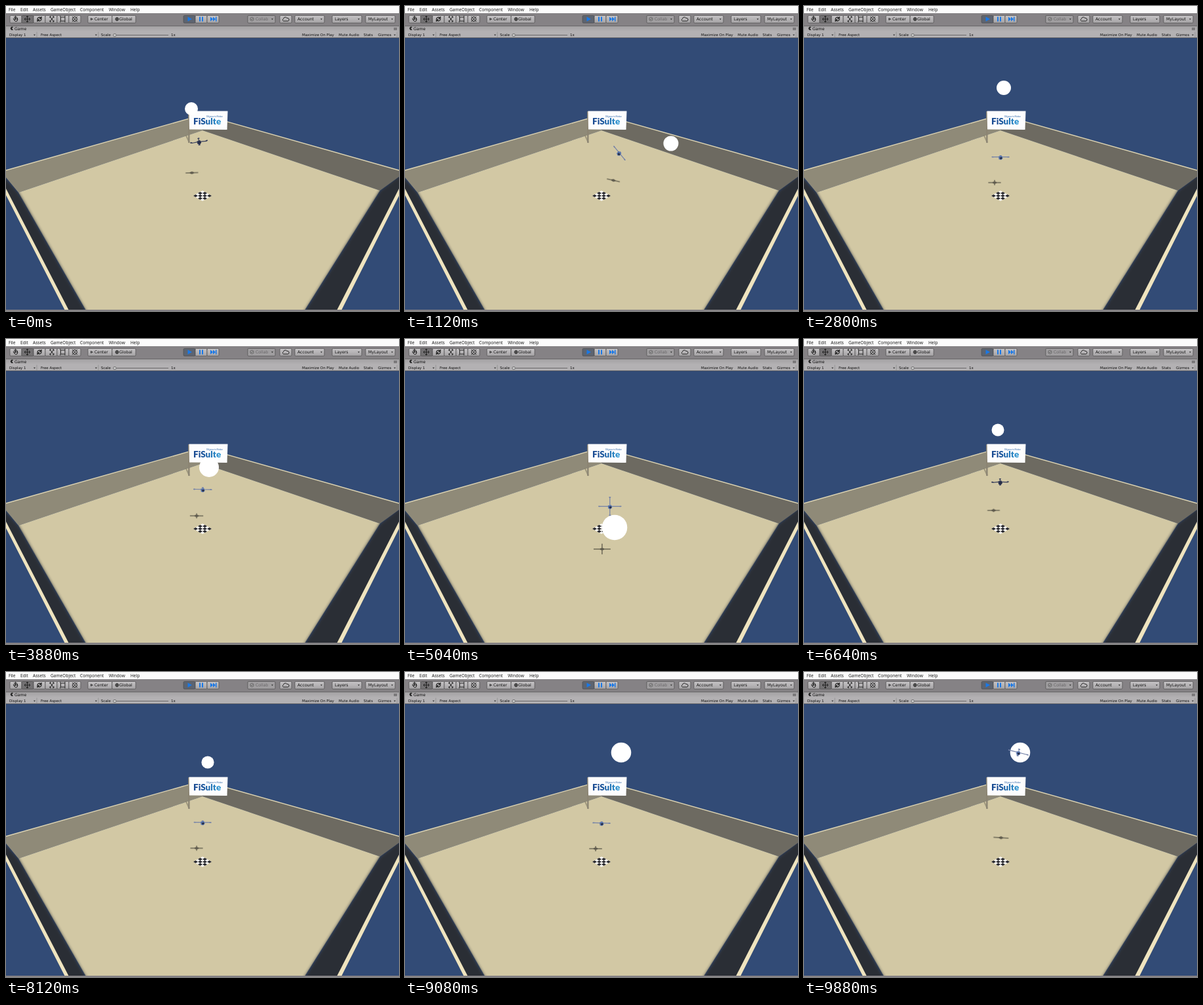
Write an HTML page that moves like this. It is 600 px wide and 466 px high and loops after 9920 ms.

```html
<!DOCTYPE html>
<html lang="en">
<head>
<meta charset="utf-8">
<title>Drone training</title>
<style>
  html, body { margin: 0; width: 100%; height: 100%; overflow: hidden; background: #324b76; }
  svg { display: block; width: 600px; height: 466px; }
  .menu { font: 6.6px "Open Sans", sans-serif; fill: #111; }
  .btn { font: 6.2px "DejaVu Sans", sans-serif; fill: #111; }
  .opt { font: 5.5px "DejaVu Sans", sans-serif; fill: #111; }
  .off { fill: #686668; }
  .sign { font: 900 13.5px Lato, sans-serif; font-variant-ligatures: none; fill: url(#brand); }
  .motto { font: 2.9px Lato, sans-serif; fill: #2b65a8; }
  .ico { fill: none; stroke: #222; stroke-width: 1; }
</style>
</head>
<body>
<svg viewBox="0 0 600 466">
  <defs>
    <filter id="soft" x="-20%" y="-20%" width="140%" height="140%"><feGaussianBlur stdDeviation="2.2"/></filter>
    <filter id="smudge" x="-60%" y="-150%" width="220%" height="400%"><feGaussianBlur stdDeviation=".7"/></filter>
    <linearGradient id="face" x2="0" y2="1"><stop stop-color="#c6c4c6"/><stop offset="1" stop-color="#a5a3a5"/></linearGradient>
    <linearGradient id="tabs" x2="0" y2="1"><stop stop-color="#a19fa1"/><stop offset="1" stop-color="#b3b1b3"/></linearGradient>
    <linearGradient id="brand"><stop offset=".25" stop-color="#184a92"/><stop offset="1" stop-color="#2d9ad6"/></linearGradient>
    <clipPath id="pit"><path d="M0 262L19 285 300 190 571 282 600 261V280L506 465H95L0 280Z"/></clipPath>
  </defs>

  <rect width="600" height="466" fill="#324b76"/>
  <path d="M0 251L300 166V190L19 285 0 262Z" fill="#8f8a78"/>
  <path d="M600 251L300 166V190L571 282 600 261Z" fill="#6d6a61"/>
  <path d="M0 251L300 166.200 600 251" fill="none" stroke="#ded5b4" stroke-width="1.4"/>
  <path d="M19 285L300 190 571 282 456 465H122Z" fill="#d2c8a4"/>
  <g clip-path="url(#pit)" fill="#292d34">
    <path d="M-12 250L19 285 122 466 130 480H80L-12 290Z" filter="url(#soft)"/>
    <path d="M612 250L571 282 456 466 447 480H520L612 290Z" filter="url(#soft)"/>
  </g>
  <path d="M0 279V289L90 465H96ZM600 279V290L512 465H505Z" fill="#efe4bf"/>
  <rect y="464" width="600" height="2" fill="#858285"/>

  <path d="M274.500 197L280 209" stroke="#8b846f" stroke-width="2" opacity=".7"/>
  <path d="M279.300 161V209" stroke="#8c8573" stroke-width="2.400"/>
  <path d="M279.500 160.500H338.500L337.500 189 280 188.500Z" fill="#fdfdfe"/>
  <text class="sign" x="286" y="181">FiSulte</text>
  <text class="motto" x="306" y="169.800">Diligence in Motion</text>
  <path d="M300 282L314 290 300 298 286 290Z" fill="#f7f6f2"/>
  <g id="board" fill="#24242a"></g>

  <g id="shadow" filter="url(#smudge)" fill="#36342f" stroke="#4b483d" stroke-width="1.500" opacity=".75">
    <path id="shadowArms"/><ellipse rx="3.200" ry="1.700" stroke="none"/>
  </g>
  <circle id="ball" fill="#fff"/>
  <g id="drone">
    <path id="arms" fill="none" stroke-width="1.200"/>
    <g id="rotors"></g>
    <path id="hull" d="M-3 -1L2 -2 3.500 2 1 4.500 -2.500 3.500Z"/>
    <path d="M-1.500 1L2 0 2.500 2.500 0 3.500Z" fill="#262c40"/>
  </g>

  <g id="chrome">
    <rect width="600" height="11" fill="#fbfbfb"/>
    <rect y="11" width="600" height="19" fill="#858285"/>
    <rect y="30" width="600" height="9" fill="url(#tabs)"/>
    <rect y="30" width="600" height=".8" fill="#5c5a5c"/>
    <rect y="39" width="600" height="9.500" fill="#b3b1b3"/>
    <rect y="48" width="600" height=".8" fill="#5c5a5c"/>
  </g>
  <g class="ico">
    <path d="M11 19l2 3v-6m1.500 5v-6m1.500 6v-5m1.500 5v-3M12 21q2 4 5 2l1-3"/>
    <path d="M28 20H37M32.500 15.500V24.500M30 18l-2 2 2 2M35 18l2 2-2 2M31 17l1.500-2 1.500 2M31 23l1.500 2 1.500-2"/>
    <path d="M48 20a3 3 0 0 1 5.500-1.500M54 20a3 3 0 0 1-5.500 1.500M54 16v3h-3M48 24v-3h3" stroke-width="1.300"/>
    <path d="M67 18v-2h2M71 16h2v2M73 22v2h-2M69 24h-2v-2M67 16l6 8M73 16l-6 8"/>
    <path d="M83.500 17H90v6h-6.500zM82 16h2M89 16h2M82 24h2M89 24h2"/>
    <circle cx="105" cy="20" r="3.500"/><path d="M101 16l8 8M109 16l-8 8" stroke-width=".8"/>
    <path d="M129 20h4M130 18v4"/>
    <circle cx="169.500" cy="20" r="2.400"/><path d="M167 20h5M169.500 17.600v5"/>
    <path d="M423.500 23a2 2 0 0 1 0-3.500 3 3 0 0 1 5.500-1 2.300 2.300 0 0 1 1.500 4.500z"/>
    <g stroke="#666"><circle cx="375.500" cy="20" r="2.700"/><path d="M374 20l1 1 2-2"/></g>
    <path d="M164 44.500H248" stroke="#6b696b"/>
    <circle cx="166" cy="44.500" r="2.200" fill="#ccc" stroke="#555" stroke-width=".7"/>
    <path d="M592 34h5M592 36h5" stroke-width=".7"/>
  </g>
  <path d="M11 32.200A2.600 2.600 0 1 0 11 36.300L8.800 34.300Z" fill="#222"/>
  <path d="M277.500 16.500L284 20l-6.500 3.500zM295 16.500h2v7h-2zM299 16.500h2v7h-2zM312 16.500l4 3.500-4 3.500zM316 16.500l4 3.500-4 3.500zM320 16.500h1.500v7H320z" fill="#1878e8"/>
</svg>

<script>
const NS = "http://www.w3.org/2000/svg";
const $ = id => document.getElementById(id);
const set = (el, attrs) => { for (const k in attrs) el.setAttribute(k, attrs[k]); return el; };
const add = (parent, tag, attrs) => parent.appendChild(set(document.createElementNS(NS, tag), attrs));
const chrome = $("chrome");

// Editor chrome
function label(cls, x, y, text) {
  add(chrome, "text", { class: cls, x, y }).textContent = text;
}
function caret(x, y) {
  add(chrome, "path", { d: `M${x} ${y}h3l-1.500 2z`, fill: "#333" });
}
function button(x, width, text = "", pad = 4, fill = "url(#face)") {
  add(chrome, "rect", { x, y: 14.5, width, height: 11.5, rx: 1.5, fill, stroke: "#4d4b4d", "stroke-width": .7 });
  label("btn", x + pad, 22.3, text);
}
function dropdown(x, text) {
  button(x, 45, text);
  caret(x + 39, 19.3);
}
function option(x, text, right) {
  label("opt", x, 46.1, text);
  if (!right) return;
  caret(right - 5, 43.5);
  add(chrome, "path", { d: `M${right} 39.500v9`, stroke: "#858385", "stroke-width": .6 });
}

const menu = { File: 4, Edit: 22, Assets: 41, GameObject: 68, Component: 113, Window: 157, Help: 190 };
for (const name in menu) label("menu", menu[name], 8, name);

for (let i = 0; i < 6; i++) button(6 + i * 18, 18, "", 0, i === 1 ? "#737173" : undefined);
for (let i = 0; i < 3; i++) button(271 + i * 18, 18, "", 0, i ? undefined : "#5d6470");
button(125, 37, "Center", 10);
button(162, 36, "Global", 11);
button(369, 42, "", 0, "#a09ea0");
label("btn off", 381, 22.3, "Collab");
caret(405, 19.3);
button(418, 18);
dropdown(441, "Account");
dropdown(498, "Layers");
dropdown(549, "MyLayout");

label("btn", 13, 36.6, "Game");
option(5, "Display 1", 47);
option(53, "Free Aspect", 141);
option(145, "Scale");
option(252, "1x");
option(452, "Maximize On Play");
option(508, "Mute Audio");
option(546, "Stats");
option(568, "Gizmos", 597);

// Checkered landing pad
for (let i = 0; i < 4; i++) for (let j = 1 - i % 2; j < 4; j += 2)
  add($("board"), "path", { d: `M${300 + (i - j) * 3.5} ${282 + (i + j) * 2}l3.500 2-3.500 2-3.500-2z` });

// Each flight: start time, then the ball to chase
const LOOP = 9920, STEP = 40, HOME = [300, 231], SHADE = [291, 270];
const flights = [
  [-680, 283, 157, 10], [520, 406, 210, 11.5], [1700, 340, 187, 15], [2740, 305, 125, 11],
  [3780, 310, 196, 15], [4400, 320, 288, 19.3], [5200, 358, 150, 13], [6200, 296, 139, 9.5],
  [7380, 325, 200, 15], [8000, 308, 138, 9.6], [9040, 330, 123, 15.3]
];

const rotors = [0, 1, 2, 3].map(() => add($("rotors"), "ellipse", { rx: 1.7, ry: .9 }));
const clamp = (v, lo, hi) => Math.min(hi, Math.max(lo, v));
const mix = (a, b, p) => a + (b - a) * p;
const mixAt = (a, b, p) => a.map((v, i) => mix(v, b[i], p).toFixed(2));
const cross = (len, h, bow) => `M${-len} ${bow}Q0 ${-bow} ${len} ${bow}M0 ${-h}V${h}`;

function draw(t) {
  const i = flights.findLastIndex(f => f[0] <= t);
  const [start, x, y, r] = flights[i];
  const end = flights[i + 1]?.[0] ?? LOOP;
  const u = (t - start) / (end - start), move = u * u, lean = Math.min(1, u * 2);
  set($("ball"), { cx: x, cy: y, r });

  // Larger balls are nearer; the shadow drifts left with height
  const goal = [x, y - (r - 10) * 2];
  const ground = 80 + 8 * r + .4 * y;
  const shadowGoal = [x - .22 * (ground - y), ground];

  const side = x - HOME[0], near = y > HOME[1];
  const roll = near ? 0 : side * .48 * lean;
  const squash = mix(.1, near ? .85 : clamp(.5 - Math.abs(side) / 200, .15, .5), lean);
  const len = mix(12, 7.5 + r * .45, lean), h = len * squash;
  const away = lean > .4 && r < 11;
  const tone = away ? "#3a415c" : "#7482a8";

  set($("drone"), { transform: `translate(${mixAt(HOME, goal, move)}) rotate(${roll})` });
  set($("arms"), { d: cross(len, h, away ? .8 : 0), stroke: tone });
  set($("hull"), { fill: away ? "#2b3352" : "#5573ad" });
  [[-len, 0], [len, 0], [0, -h], [0, h]].forEach(([cx, cy], k) => set(rotors[k], { cx, cy, fill: tone }));

  set($("shadow"), { transform: `translate(${mixAt(SHADE, shadowGoal, move)}) rotate(${roll / 4})` });
  set($("shadowArms"), { d: cross(len * .8, len * mix(.35, near ? .5 : .15, lean), 0) });
}

function tick() {
  draw(Math.floor(performance.now() % LOOP / STEP) * STEP);
  requestAnimationFrame(tick);
}
tick();
</script>
</body>
</html>
```
